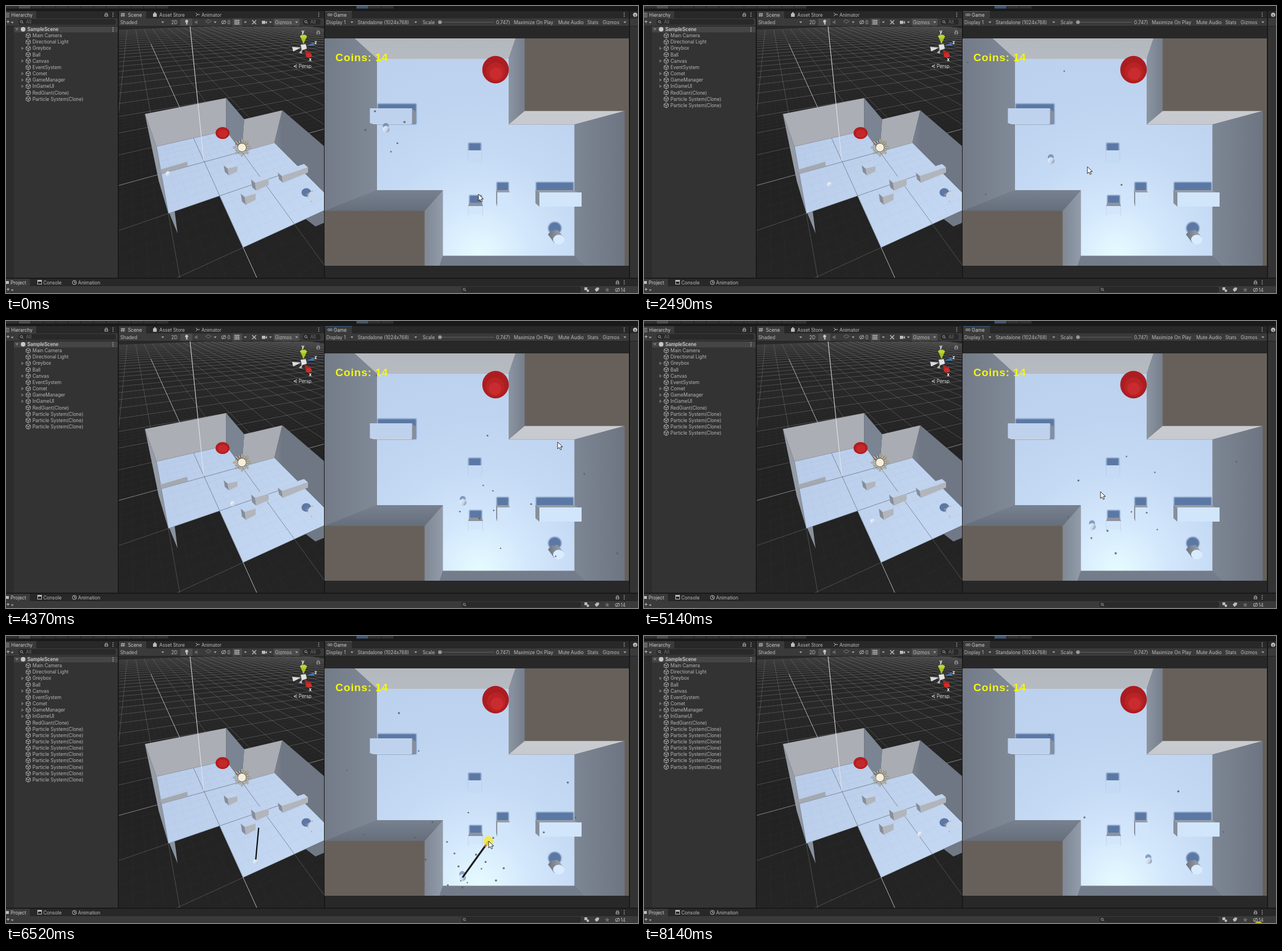
An HTML page with a canvas that plays this animation: 1109 by 505 pixels, repeating every 8210 ms.

```html
<!DOCTYPE html>
<html lang="en">
<head>
<meta charset="utf-8">
<title>Editor play mode</title>
<style>
html, body { margin: 0; width: 100%; height: 100%; overflow: hidden; background: #191919; }
canvas { display: block; width: 1109px; height: 505px; }
</style>
</head>
<body>
<canvas id="stage" width="1109" height="505"></canvas>
<script>
const LOOP = 8210;
const TILE = 115.5;
const stage = document.getElementById('stage').getContext('2d');
const base = document.createElement('canvas');
base.width = 1109; base.height = 505;
let c = base.getContext('2d');

// ---------- drawing helpers ----------
function rect(x, y, w, h, fill) { c.fillStyle = fill; c.fillRect(x, y, w, h); }
function trace(p, close) {
  c.beginPath();
  for (let i = 0; i < p.length; i += 2) c.lineTo(p[i], p[i + 1]);
  if (close) c.closePath();
}
function poly(fill, ...p) { trace(p, true); c.fillStyle = fill; c.fill(); }
function line(color, w, ...p) { trace(p); c.strokeStyle = color; c.lineWidth = w; c.stroke(); }
function oval(x, y, rx, ry, fill) {
  c.beginPath(); c.ellipse(x, y, rx, ry, 0, 0, Math.PI * 2); c.fillStyle = fill; c.fill();
}
function ring(x, y, rx, ry, color) {
  c.beginPath(); c.ellipse(x, y, rx, ry, 0, 0, Math.PI * 2);
  c.strokeStyle = color; c.lineWidth = 1; c.stroke();
}
function label(s, x, cy, color = '#bcbcbc', weight = 400, size = 8.25) {
  c.font = `${weight} ${size}px Inter, "Liberation Sans", sans-serif`;
  c.fillStyle = color; c.fillText(s, x, cy + 3);
}
function withStops(g, stops) {
  stops.forEach((s, i) => g.addColorStop(i / (stops.length - 1), s));
  return g;
}
const fade = (x0, y0, x1, y1, ...stops) => withStops(c.createLinearGradient(x0, y0, x1, y1), stops);
const glow = (x, y, r, ...stops) => withStops(c.createRadialGradient(x, y, 0, x, y, r), stops);
function clipped(x, y, w, h, draw) {
  c.save(); c.beginPath(); c.rect(x, y, w, h); c.clip(); draw(); c.restore();
}
function blurred(draw) { c.save(); c.filter = 'blur(0.8px)'; draw(); c.restore(); }

// ---------- room: one outline in tiles, seen by two cameras ----------
const outline = [[0, 0], [2, 0], [2, 1], [3, 1], [3, 3], [1, 3], [1, 2], [0, 2]];
const shades = [
  ['#b6bac1', '#b0b4bb'], ['#8c95a2', '#767e8b'], ['#c6c9ce', '#c8cbcf'], ['#7d8694', '#6d7582'],
  ['#747d8b', '#6d7583'], ['#929caa', '#7f8794'], ['#778190', '#666e7b'], ['#808997', '#737b88']
];
const topView = {
  floor: (s, t) => [651 + s * TILE, 93 + t * TILE],
  lift: ([x, y]) => [x + .52 * (x - 828), y + .52 * (y - 254)]
};
const sceneView = {
  floor(s, t) {
    const w = 1 + .064 * s - .156 * t;
    return w > .12 && [(264 + 86 * s - 34 * t) / w, (247 + 2.1 * t) / w];
  },
  lift: ([x, y]) => [x + .165 * (x - 387), y - 57]
};
const toScene = (x, y) => sceneView.floor((x - 651) / TILE, (y - 93) / TILE);
const floorPath = view => outline.flatMap(([s, t]) => view.floor(s, t));

function wall(view, i, near, far = near) {
  const a = view.floor(...outline[i]), b = view.floor(...outline[(i + 1) % 8]);
  const a2 = view.lift(a), b2 = view.lift(b), alongX = i % 2 === 0;
  const fill = alongX ? fade(0, a[1], 0, a2[1], near, far) : fade(a[0], 0, a2[0], 0, near, far);
  poly(fill, ...a, ...b, ...b2, ...a2);
}

function gridLine(pos, alongT, span, color) {
  const pts = [];
  for (let k = -span; k <= span; k += .25) {
    const p = alongT ? sceneView.floor(pos, k) : sceneView.floor(k, pos);
    if (p) pts.push(...p);
  }
  line(color, 1, ...pts);
}
function grid(step, span, reach, color) {
  for (let k = -span; k <= span; k += step) {
    gridLine(k, true, reach, color);
    gridLine(k, false, reach, color);
  }
}

// ---------- icons ----------
const caret = (x, y) => poly('#a8a8a8', x - 2.5, y - 1.3, x + 2.5, y - 1.3, x, y + 1.7);
function kebab(x, y) { for (const d of [-3, 0, 3]) rect(x, y + d - .5, 1.4, 1.4, '#c0c0c0'); }
function lock(x, y) {
  ring(x, y - 1, 1.8, 1.8, '#b0b0b0');
  rect(x - 3, y - .5, 6, 4, '#b0b0b0'); rect(x - 2, y + .5, 4, 2, '#333');
}
function search(x, y, w, text) {
  c.beginPath(); c.roundRect(x, y, w, 10, 4); c.fillStyle = '#292929'; c.fill();
  ring(x + 5, y + 4.5, 2, 2, '#a0a0a0'); line('#a0a0a0', 1, x + 6.5, y + 6, x + 8.5, y + 8);
  label(text, x + 13, y + 5, '#707070');
}
function eye(x, y) { ring(x, y, 4, 2.5, '#b8b8b8'); line('#b8b8b8', 1, x - 3, y + 3.5, x + 3, y - 3.5); }
function cube(x, y) {
  const hex = [];
  for (let i = 0; i < 6; i++) hex.push(x + 4.4 * Math.sin(i * Math.PI / 3), y - 4.4 * Math.cos(i * Math.PI / 3));
  line('#b4b4b4', 1, ...hex, hex[0], hex[1]);
  line('#b4b4b4', 1, x - 4, y - 2, x, y, x + 4, y - 2);
  line('#b4b4b4', 1, x, y, x, y + 4);
}
function row(n, name, folded) {
  const y = 41 + n * 11.15;
  if (folded) poly('#6c6c6c', 27, y - 3, 27, y + 3, 31.5, y);
  cube(39, y);
  label(name, 46.5, y, '#b6b6b6');
}
function menu(text, x, arrow) { label(text, x, 28.5); if (arrow) caret(arrow, 28.5); }

// ---------- editor chrome ----------
function panel(x, w, tab) {
  rect(x, 9, w, 469, '#333');
  rect(x, 9, w, 12.5, '#282828');
  rect(x, 9, tab, 13, '#3a3a3a');
  rect(x, 22, w, 13, '#3a3a3a');
  rect(x, 35, w, 1, '#232323');
}
function hierarchy() {
  panel(0, 196, 53);
  label('Hierarchy', 9, 15.5, '#d0d0d0');
  for (const y of [13, 16, 19]) line('#b4b4b4', 1, 0, y, 6, y);
  lock(176, 15); kebab(187, 15);
  label('+', 0, 28, '#d0d0d0', 400, 11); caret(11, 29);
  search(22, 23, 171, 'All');
  rect(0, 36, 14, 442, '#2c2c2c');
  rect(14, 36, 182, 10.5, '#454545');
  poly('#777', 16, 39, 22, 39, 19, 43.5);
  oval(30, 41, 4, 4, '#c8c8c8');
  label('SampleScene', 37.5, 41, '#cecece', 600);
  kebab(187, 41);
  ['Main Camera', 'Directional Light', '>Greybox', 'Ball', '>Canvas', 'EventSystem', '>Comet',
    '>GameManager', '>InGameUI', 'RedGiant(Clone)'].forEach((s, i) => row(i + 1, s.replace('>', ''), s[0] === '>'));
}
function sceneBar() {
  panel(198, 360, 48);
  for (const d of [0, 3]) {
    line('#c0c0c0', 1, 204 + d, 12, 203 + d, 19);
    line('#c0c0c0', 1, 201, 14 + d, 209, 14 + d);
  }
  label('Scene', 214, 15.5, '#d0d0d0');
  rect(258, 13, 6.5, 6, '#bcbcbc'); rect(260, 11, 2.5, 2, '#bcbcbc');
  label('Asset Store', 269, 15.5);
  line('#bcbcbc', 1, 333, 12, 336, 15, 340, 15); line('#bcbcbc', 1, 333, 18, 336, 15);
  label('Animator', 343, 15.5);
  kebab(548, 15);
  rect(306, 22, 21, 13, '#4c4c4c'); rect(398, 22, 16, 13, '#4c4c4c'); rect(470, 22, 45, 13, '#4c4c4c');
  menu('Shaded', 200.5, 275); menu('2D', 290);
  oval(317, 27, 2.5, 2.8, '#c8c8c8'); rect(316, 30, 2.5, 2.5, '#c8c8c8');
  poly('#686868', 331, 27, 333, 27, 336, 24.5, 336, 32, 333, 30, 331, 30);
  line('#686868', 1.2, 350, 27, 355, 24, 360, 27, 355, 30, 350, 27); caret(367, 28.5);
  eye(382, 28.5); label('0', 388.5, 28.5);
  for (const d of [0, 3, 6]) { line('#ccc', .8, 402 + d, 24, 402 + d, 33); line('#ccc', .8, 401, 25.5 + d, 410, 25.5 + d); }
  caret(420, 28.5);
  line('#bbb', 1.5, 432, 25, 439, 32); line('#bbb', 1.5, 439, 25, 432, 32);
  rect(449, 26, 6, 5.5, '#bbb'); poly('#bbb', 455, 29, 458, 26, 458, 31.5); caret(464, 28.5);
  menu('Gizmos', 472, 510);
  search(521, 23, 31, 'All');
}
function gameBar() {
  panel(560, 533, 47);
  rect(560, 9, 47, 1, '#35618f');
  ring(566.5, 15.5, 1.8, 1.8, '#bcbcbc'); ring(570.5, 15.5, 1.8, 1.8, '#bcbcbc');
  label('Game', 575, 15.5, '#d0d0d0'); kebab(1084, 15);
  menu('Display 1', 562, 607); menu('Standalone (1024x768)', 617, 719); menu('Scale', 731);
  rect(758, 28, 98, 1, '#606060'); oval(761.5, 28.5, 3.2, 3.2, '#989898');
  menu('0.747)', 860); menu('Maximize On Play', 891); menu('Mute Audio', 969);
  menu('Stats', 1020); menu('Gizmos', 1047, 1086);
  panel(1095, 14, 0);
  oval(1104, 15.5, 3.7, 3.7, '#c0c0c0'); rect(1103.5, 14.5, 1.2, 4, '#282828');
}
function bottomBar() {
  rect(0, 480, 1109, 13, '#282828'); rect(0, 480, 42, 13, '#3a3a3a');
  rect(0, 493, 1109, 12, '#3a3a3a');
  rect(0, 484, 5, 5, '#bcbcbc'); label('Project', 8, 486.5, '#d0d0d0');
  rect(55, 482, 8, 8, '#bcbcbc'); rect(56, 485, 6, 4, '#282828'); label('Console', 65.5, 486.5);
  ring(120, 486.5, 3.6, 3.6, '#bcbcbc'); line('#bcbcbc', 1, 120, 484, 120, 487, 122.5, 487);
  label('Animation', 126.5, 486.5);
  lock(1073, 486); kebab(1084, 486);
  label('+', 0, 499, '#d0d0d0', 400, 11); caret(11, 500);
  search(799, 494, 210, '');
  rect(1015, 495, 5, 5, '#bcbcbc'); oval(1021, 501, 2.2, 2.2, '#bcbcbc');
  poly('#bcbcbc', 1033, 499, 1037, 495, 1041, 496, 1040, 500, 1036, 503);
  const star = [];
  for (let i = 0; i < 10; i++) {
    const a = i * Math.PI / 5, r = i % 2 ? 1.9 : 4.5;
    star.push(1055 + r * Math.sin(a), 499.5 - r * Math.cos(a));
  }
  poly('#6c6c6c', ...star);
  eye(1073, 499.5); label('14', 1078.5, 499.5);
}
function chrome() {
  rect(0, 0, 1109, 505, '#191919');
  for (let x = 0; x < 270; x += 22) rect(x, 0, 21, 4.5, x === 22 ? '#4c4c4c' : '#303030');
  for (let x = 615; x < 680; x += 22) rect(x, 0, 21, 4.5, x === 615 ? '#3f566f' : '#303030');
  hierarchy(); sceneBar(); gameBar(); bottomBar();
}

// ---------- scene view ----------
function sceneBox(x, y, w, rise, h) {
  poly('#868d99', x, y, x + 7, y + 6, x + 9, y + h + 6, x + 2, y + h);
  poly('#c0d2ec', x, y, x + w - 7, y - rise, x + w, y + 6 - rise, x + 7, y + 6);
  poly('#b1b5bc', x + 7, y + 6, x + w, y + 6 - rise, x + w, y + h + 3 - rise, x + 9, y + h + 6);
}
function sun(x, y) {
  for (const [color, w] of [['#4b4637', 2.6], ['#f3ead2', 1.3]])
    for (let i = 0; i < 16; i++) {
      const dx = Math.cos(i * Math.PI / 8), dy = Math.sin(i * Math.PI / 8), r = i % 2 ? 13 : 15.5;
      line(color, w, x + dx * 9, y + dy * 9, x + dx * r, y + dy * r);
    }
  oval(x, y, 8, 8, '#6a6450'); oval(x, y, 7, 7, '#f7eed9');
}
function compass() {
  poly('#a9c422', 522, 67, 516.5, 54, 528, 54); oval(522, 53.5, 6, 3, '#b9d736');
  poly('#4073b5', 527, 70, 540, 64, 541, 70);
  poly('#b42421', 524, 77, 536, 83, 527, 90); oval(531.5, 87, 5.3, 4, '#cc2e2a');
  poly('#dcdcdc', 518, 73, 502, 72, 504, 80); poly('#b8b8b8', 520, 76, 514, 82, 519, 84);
  poly('#e2e2e2', 517, 68, 526, 67, 528, 75, 519, 78);
  label('y', 518.5, 45, '#fff', 700); label('z', 541, 64, '#fff', 700); label('x', 531.5, 94, '#fff', 700);
  line('#ccc', 1, 511, 103, 505, 106, 511, 109); line('#ccc', .8, 505, 106, 511, 106);
  label('Persp', 513.5, 106, '#ddd');
  lock(548, 46);
}
function drawScene() {
  rect(198, 36, 360, 442, fade(0, 36, 0, 478, '#292929', '#222', '#242424'));
  grid(.2, 6, 7, 'rgba(150,150,150,.045)');
  grid(1, 24, 24, 'rgba(170,170,170,.3)');
  gridLine(1, true, 14, 'rgba(215,215,215,.7)');
  gridLine(1, false, 14, 'rgba(190,190,190,.45)');
  poly('#717987', 526, 375, 580, 350, 580, 372, 543, 388);
  poly('#8a929f', 286, 363, 296, 361, 301, 400);

  const floor = floorPath(sceneView);
  poly(fade(270, 250, 460, 420, '#b9cce9', '#c3d7f2'), ...floor);
  c.save(); trace(floor, true); c.clip();
  grid(.2, 3, 3, 'rgba(120,140,170,.07)');
  grid(1, 3, 3, 'rgba(84,92,104,.6)');
  c.restore();
  wall(sceneView, 0, '#abaeb4'); wall(sceneView, 1, '#7b8492'); wall(sceneView, 2, '#a9acb2');
  wall(sceneView, 3, '#7b8390', '#6f7784'); wall(sceneView, 7, '#868f9c', '#969ca6');

  poly('#a4a8b0', 270, 288, 318, 274, 319, 282, 273, 295);
  sceneBox(382, 280, 24, 4, 12);
  sceneBox(430, 305, 31, 7, 14);
  sceneBox(412, 330, 26, 6, 14);
  sceneBox(477, 293, 53, 15, 12);
  oval(527, 328, 8.5, 7.5, '#5d78a4');
  poly('#8a919d', 526, 331, 538, 325, 545, 336, 536, 345);
  oval(538, 335, 8, 9, '#c4d5ec');
  line('#e8e8e8', 1, 323, 36, 347, 272);
  oval(380, 223.5, 12.3, 10.6, '#b11e20'); oval(380.5, 224.5, 8.5, 7, '#c4282a');
  sun(414, 249);
  compass();
}

// ---------- game view ----------
function block(x, y, w, h, depth) {
  blurred(() => rect(x + 1, y, w - 1, 16, '#5b78a5'));
  poly('#878f9b', x, y + 14, x + depth, y + 18, x + depth, y + 18 + h, x, y + 12 + h);
  poly('#979da7', x, y + 14, x + w, y + 14, x + w + depth, y + 18, x + depth, y + 18);
  rect(x + depth, y + 18, w + depth, h, '#d1e5fb');
}
function drawGame() {
  rect(560, 36, 533, 442, '#282828');
  clipped(559, 57, 534, 400, () => {
    rect(559, 57, 534, 400, '#67605a');
    shades.forEach((s, i) => wall(topView, i, ...s));
    poly(glow(830, 440, 360, '#e6fcff', '#d3e7fc', '#c5daf4', '#bfd4f0', '#bcd1ed'), ...floorPath(topView));
  });

  blurred(() => rect(652, 172, 68, 36, '#5b78a5'));
  poly('#858e9c', 712, 180, 719, 186, 719, 206, 712, 208);
  rect(638.5, 180, 74, 26, '#bed2ee'); poly('#cad3df', 638.5, 206, 712.5, 206, 711, 208, 645, 208);

  blurred(() => { rect(811.5, 241, 22, 14, '#5b78a5'); rect(813, 333, 22, 15, '#5b78a5'); });
  rect(810, 254, 25, 22, '#c5daf4');
  poly('#8d949f', 813, 346, 835, 346, 837, 352, 811, 352);
  rect(811, 352, 26, 14, '#d2e7fc');
  for (const [x, y] of [[810.5, 254], [835, 254], [811, 352], [836.5, 352]])
    line('rgba(150,165,185,.4)', .7, x, y, x, y + 18);

  block(860, 310, 22, 25, 2);
  block(929, 310, 67, 25, 7);
  blurred(() => oval(963, 391, 11.5, 11, '#5b78a5'));
  poly(fade(951, 0, 977, 0, '#6c7480', '#a0a7b1'), 951, 402, 957, 395, 968, 394, 979, 407, 962, 417);
  oval(970, 411, 10, 8.5, '#d9ebfe');

  oval(859, 112, 23.3, 24.2, '#ab1d20');
  c.font = '700 19px "Liberation Sans", Arial, sans-serif';
  c.letterSpacing = '0.8px'; c.fillStyle = '#f4f610';
  c.fillText('Coins: 14', 578, 97);
  c.letterSpacing = '0px';
}

chrome();
clipped(198, 36, 360, 442, drawScene);
drawGame();

// ---------- motion ----------
const ballPath = [[0, 667, 217], [1480, 666, 260], [2350, 674, 268], [3450, 989, 299], [4370, 802, 319],
  [5830, 773, 400], [6520, 801, 425], [7300, 867, 338], [LOOP, 887, 400]];
const mousePath = [[0, 829, 331], [920, 827, 330], [1480, 698, 266], [2350, 770, 282], [3410, 936, 300],
  [4370, 968, 213], [5830, 660, 374], [6520, 847, 361], [7600, 938, 512], [LOOP, 1084, 511]];
const drags = [[1800, 2350], [3120, 3560], [6200, 6700]];

// every hit adds a particle system to the list and throws some dots
const hits = [-20, 900, 2500, 3500, 4220, 4800, 5200, 5600, 5950, 6150, 6300, 6450];
const SYSTEM_LIFE = 3450, DOT_LIFE = 1900;

function along(path, t, ease) {
  let i = 1;
  while (i < path.length - 1 && path[i][0] <= t) i++;
  const [t0, x0, y0] = path[i - 1], [t1, x1, y1] = path[i];
  let k = (t - t0) / (t1 - t0);
  if (ease) k = k * k * (3 - 2 * k);
  return [x0 + (x1 - x0) * k, y0 + (y1 - y0) * k];
}
function random(seed) {
  const n = Math.sin(seed * 127.1 + 11.7) * 43758.5453;
  return n - Math.floor(n);
}
function debris(t) {
  hits.forEach((hit, n) => {
    const age = t - hit;
    if (age < 0 || age > DOT_LIFE) return;
    const [x, y] = along(ballPath, Math.max(hit, 0));
    for (let i = 0; i < 5; i++) {
      const seed = n * 31 + i * 3;
      const a = (i + random(seed)) * Math.PI * .4;
      const d = (40 + 110 * random(seed + 1)) * (.25 + age / 1000);
      const r = 1.2 + random(seed + 2) * .8;
      oval(x + d * Math.cos(a), y + d * Math.sin(a), r, r, 'rgba(88,100,104,.85)');
    }
  });
}
function sphere(x, y) {
  oval(x - .5, y - 6, 5.3, 5.3, 'rgba(80,110,155,.6)');
  oval(x, y, 6, 6, fade(x - 4, y - 2, x + 6, y + 3, '#dfeafa', '#c6d5ea', '#8490a2'));
}
function pointer(x, y, pressed) {
  if (pressed) oval(x - .5, y - .5, 8.5, 8.5, 'rgba(246,232,40,.75)');
  c.save(); c.translate(x, y);
  trace([0, 0, 0, 12, 2.8, 9.4, 4.7, 13.5, 6.8, 12.6, 5, 8.6, 8.8, 8.4], true);
  c.fillStyle = '#fff'; c.fill();
  c.strokeStyle = '#111'; c.lineWidth = .9; c.stroke();
  c.restore();
}

function draw(t) {
  c = stage;
  c.drawImage(base, 0, 0);
  const systems = hits.filter(h => h <= t && t < h + SYSTEM_LIFE).length;
  for (let i = 0; i < systems; i++) row(11 + i, 'Particle System(Clone)');

  const [bx, by] = along(ballPath, t);
  const [mx, my] = along(mousePath, t, true);
  const aiming = drags.some(([from, to]) => t >= from && t < to);
  const [sx, sy] = toScene(bx, by);

  clipped(198, 36, 360, 442, () => {
    if (aiming) line('#0c0c0c', 2.2, sx, sy - 2, ...toScene(mx, my));
    oval(sx, sy - 1, 4.4, 4.4, fade(sx - 3, sy - 4, sx + 4, sy + 3, '#f0f6ff', '#b4c3d8'));
  });

  clipped(559, 57, 534, 400, () => {
    const sway = Math.sin(t / 900);
    oval(859.5 + sway, 116, 16.5, 16.5, '#b82326');
    oval(860 + sway * 2, 119, 11, 11, '#c92b2e');
    debris(t);
    sphere(bx, by);
    if (aiming) {
      line('#1c1c1c', 3.2, bx, by, mx, my);
      line('#c9601c', 3.2, bx + (mx - bx) * .85, by + (my - by) * .85, mx, my);
    }
  });
  pointer(mx, my, aiming || t > 7900);
}

function tick(now) {
  draw(now % LOOP);
  requestAnimationFrame(tick);
}
draw(0);
requestAnimationFrame(tick);
</script>
</body>
</html>
```
